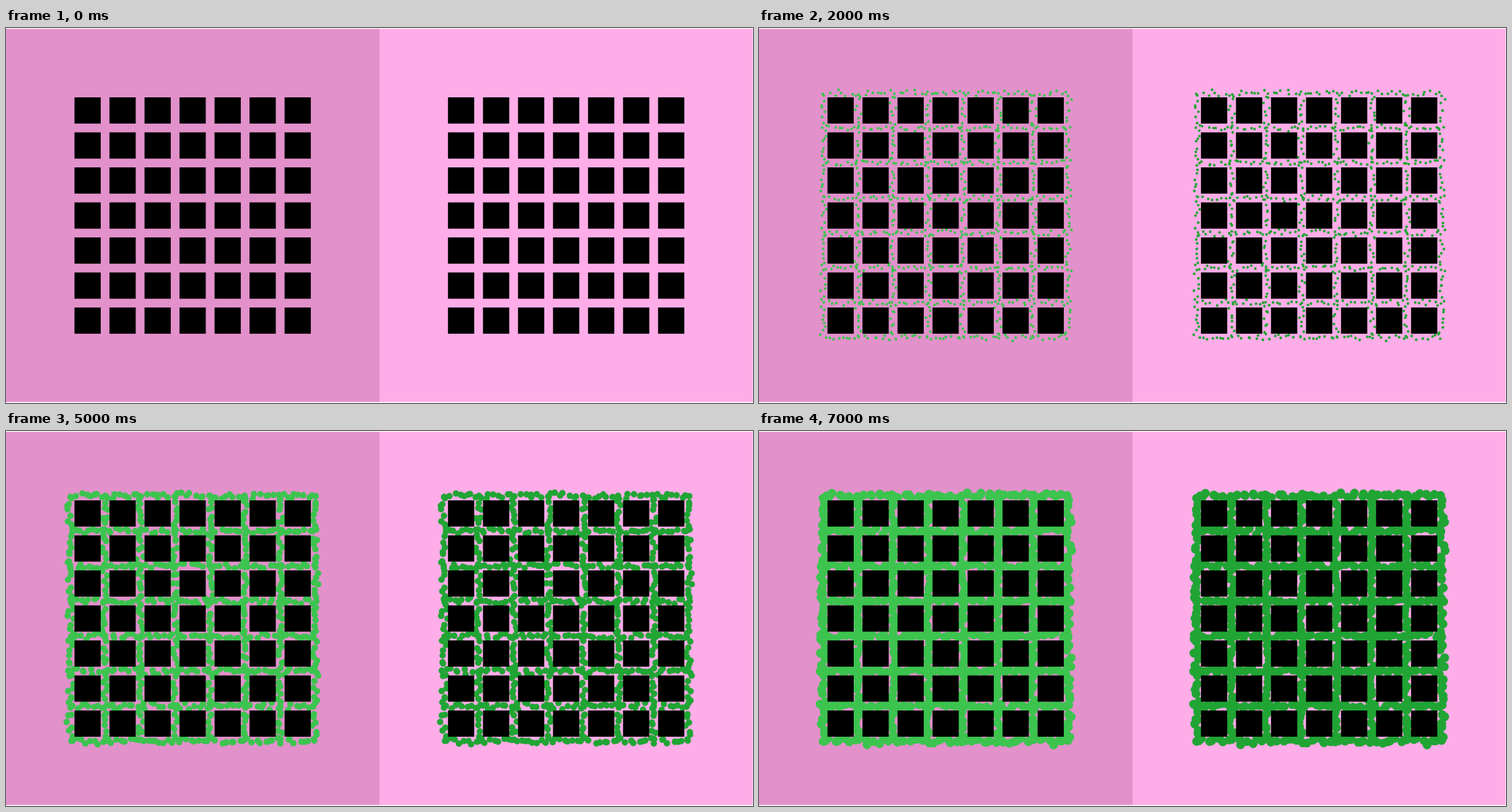
Animation of 1056x530 px, one loop 8000 ms. Source, as an HTML page with a canvas:

```html
<!DOCTYPE html>
<html lang="en">
<head>
<meta charset="utf-8">
<title>Dots between squares</title>
<style>
  html, body { margin: 0; width: 100%; height: 100%; overflow: hidden; background: #fff; }
  canvas { display: block; }
</style>
</head>
<body>
<canvas id="stage" width="1056" height="530"></canvas>
<script>
const ctx = document.getElementById('stage').getContext('2d');

const STEP = 1000, STEPS = 8;
const COUNT = 7, PITCH = 49.5, SIZE = 37.1;
const LEFT = 96.8, TOP = 98;
const GAP = PITCH - SIZE;
const JITTER = 5.5, PER_SEGMENT = 8;

const panels = [
  { x: 0, w: 528, back: '#e291cb', dot: '#3cc44f' },
  { x: 528, w: 527.5, back: '#ffade8', dot: '#20a534' }
];

const radius = step => 0.2 + 0.87 * step;

function seeded(seed) {
  return () => {
    seed = (seed + 0x6D2B79F5) | 0;
    let t = Math.imul(seed ^ (seed >>> 15), 1 | seed);
    t = (t + Math.imul(t ^ (t >>> 7), 61 | t)) ^ t;
    return ((t ^ (t >>> 14)) >>> 0) / 4294967296;
  };
}

// Spread dots along every street of the grid, anew for each step.
function scatter(step) {
  const rand = seeded(step * 7919 + 17);
  const dots = [];
  const x0 = LEFT - GAP / 2, y0 = TOP - GAP / 2;
  const wobble = () => (rand() + rand() - 1) * JITTER;
  const along = k => (k + rand()) / PER_SEGMENT * PITCH;
  for (let line = 0; line <= COUNT; line++) {
    for (let k = 0; k < COUNT * PER_SEGMENT; k++) {
      dots.push([x0 + along(k), y0 + line * PITCH + wobble()]);
      dots.push([x0 + line * PITCH + wobble(), y0 + along(k)]);
    }
  }
  return dots;
}

const layouts = Array.from({ length: STEPS }, (_, i) => i ? scatter(i) : []);

function drawPanel(panel, step) {
  ctx.save();
  ctx.translate(panel.x, 0);
  ctx.fillStyle = panel.back;
  ctx.fillRect(0, 1.2, panel.w, 527.4);

  ctx.fillStyle = panel.dot;
  ctx.beginPath();
  const r = radius(step);
  for (const [x, y] of layouts[step]) {
    ctx.moveTo(x + r, y);
    ctx.arc(x, y, r, 0, Math.PI * 2);
  }
  ctx.fill();

  ctx.fillStyle = '#000';
  for (let row = 0; row < COUNT; row++) {
    for (let col = 0; col < COUNT; col++) {
      ctx.fillRect(LEFT + col * PITCH, TOP + row * PITCH, SIZE, SIZE);
    }
  }
  ctx.restore();
}

function draw(step) {
  ctx.fillStyle = '#fff';
  ctx.fillRect(0, 0, 1056, 530);
  for (const panel of panels) drawPanel(panel, step);
}

const start = performance.now();
let shown = 0;

function tick() {
  const elapsed = Math.max(0, performance.now() - start);
  const step = Math.floor(elapsed / STEP) % STEPS;
  if (step !== shown) draw(shown = step);
  requestAnimationFrame(tick);
}

draw(0);
requestAnimationFrame(tick);
</script>
</body>
</html>
```
